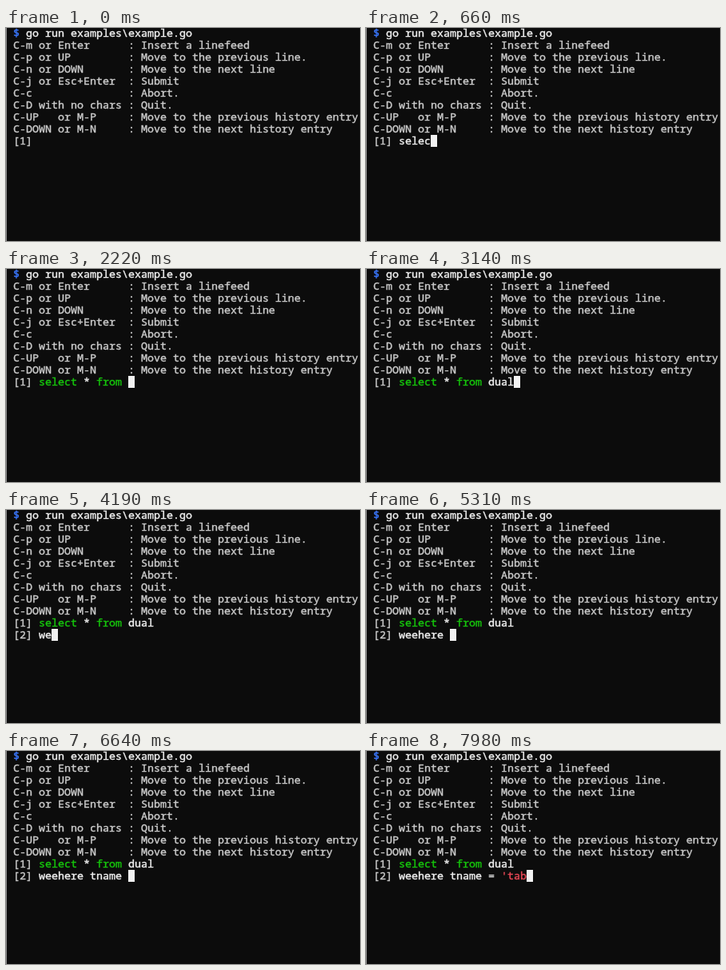
An HTML page for the animation above (8000 ms loop, 443x267 px).

```html
<!DOCTYPE html>
<html lang="en">
<head>
<meta charset="utf-8">
<title>Multi-line editor demo</title>
<style>
html, body { margin: 0; width: 100%; height: 100%; overflow: hidden; background: #0c0c0c; }
body { position: relative; box-sizing: border-box; border-left: 1px solid #909090; }
pre {
  position: absolute; left: 8px; top: -1px; margin: 0;
  font: 13.3333px/15px "Noto Sans Mono", "DejaVu Sans Mono", monospace;
  font-variant-ligatures: none; color: #ccc;
  -webkit-text-stroke: 0.4px;
}
#input { top: 134px; }
.prompt { color: #3b78ff; }
.plain { color: #f2f2f2; }
.keyword { color: #16c60c; }
.string { color: #e74856; }
#cursor { position: absolute; width: 8px; height: 15px; background: #f2f2f2; }
</style>
</head>
<body>
<pre><span class="prompt">$</span> <span class="plain">go run examples\example.go</span>
C-m or Enter      : Insert a linefeed
C-p or UP         : Move to the previous line.
C-n or DOWN       : Move to the next line
C-j or Esc+Enter  : Submit
C-c               : Abort.
C-D with no chars : Quit.
C-UP   or M-P     : Move to the previous history entry
C-DOWN or M-N     : Move to the next history entry</pre>
<pre id="input"></pre>
<div id="cursor"></div>
<script>
const LOOP = 8000, CELL = 8, ROW = 15;
const input = document.getElementById('input');
const cursor = document.getElementById('cursor');

// Bursts of even typing: text, first and last keystroke in ms
const bursts = [
  ['selec', 70, 660],
  ['t * f', 930, 1460],
  ['rom', 1660, 1820],
  [' ', 2220, 2220],
  ['dual', 2810, 3140],
  ['\nwe', 3470, 4190],
  ['ehere ', 4520, 5310],
  ['tname ', 5990, 6640],
  ["= '", 7100, 7440],
  ['tab', 7900, 7980]
];

function typed(burst, now) {
  const [text, start, end] = burst;
  if (now < start) return '';
  if (now >= end) return text;
  const step = (end - start) / (text.length - 1);
  return text.slice(0, 1 + Math.floor((now - start) / step));
}

const span = (kind, s) => `<span class="${kind}">${s}</span>`;

const highlight = line => line.replace(/\b(?:select|from)\b|'[^']*'?|[^\s']+/g, token =>
  span(/^(select|from)$/.test(token) ? 'keyword' : token[0] === "'" ? 'string' : 'plain', token));

let shown = null;

function draw() {
  const now = performance.now() % LOOP;
  const text = bursts.map(burst => typed(burst, now)).join('');
  if (text !== shown) {
    shown = text;
    const lines = text.split('\n');
    input.innerHTML = lines.map((line, i) => `[${i + 1}] ${highlight(line)}`).join('\n');
    const row = lines.length - 1;
    cursor.style.left = 8 + CELL * (4 + lines[row].length) + 'px';
    cursor.style.top = 134 + ROW * row + 'px';
    cursor.hidden = text === '';
  }
  requestAnimationFrame(draw);
}
draw();
</script>
</body>
</html>
```
